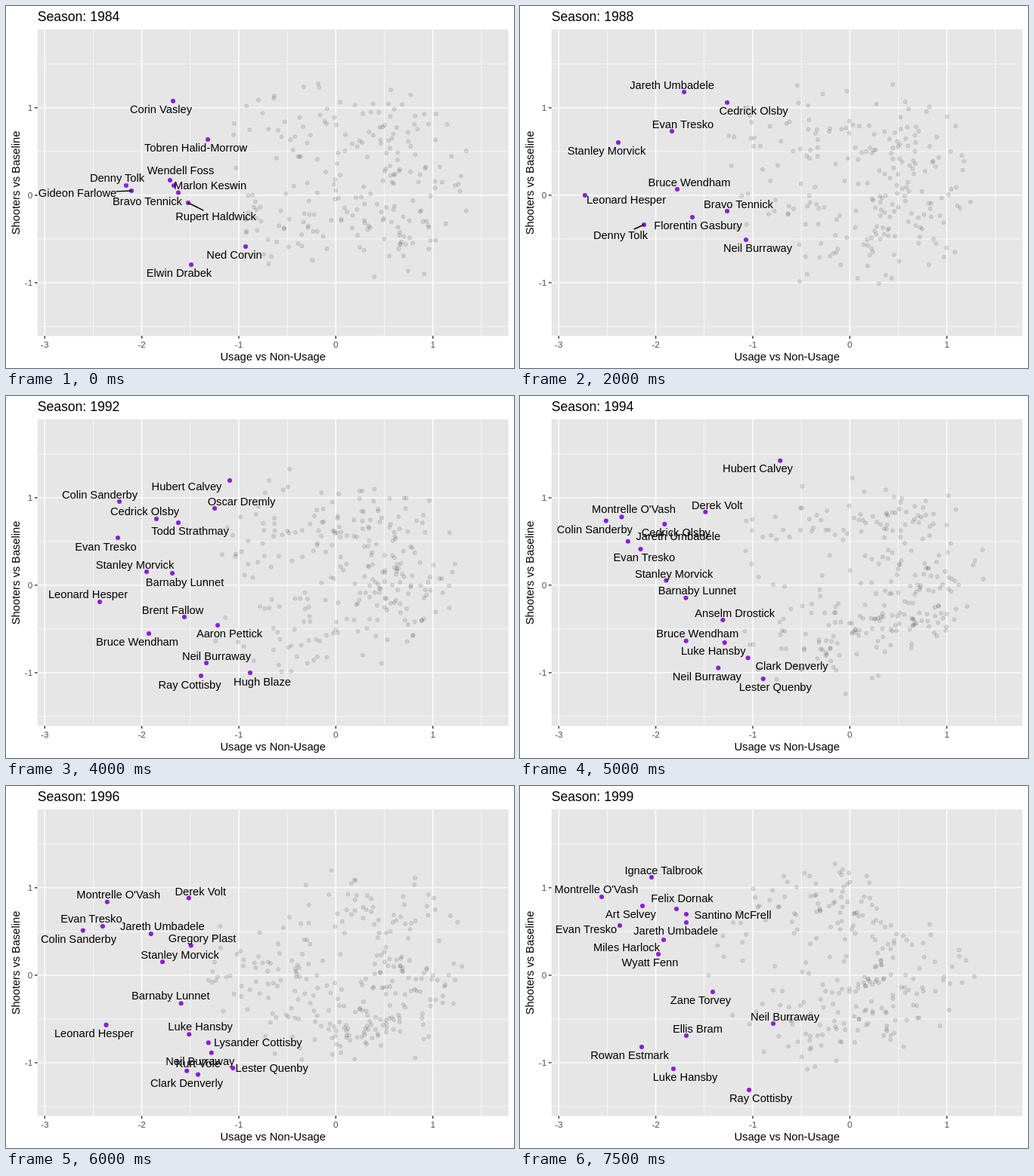
Animation, 672 px wide and 480 px high, one loop 8 s. Source, as an HTML page:

```html
<!DOCTYPE html>
<html lang="en">
<head>
<meta charset="utf-8">
<title>Season scatter</title>
<style>
  html, body { margin: 0; width: 100%; height: 100%; overflow: hidden; background: #fff; }
  svg { display: block; font: 14.67px "Liberation Sans", Arial, sans-serif; }
  .axis { font-size: 11.73px; fill: #4d4d4d; }
  .cloud { fill: #000; fill-opacity: .1; stroke: #000; stroke-opacity: .1; stroke-width: .945; }
  .stars { fill: #8a1fd6; }
  .leaders { stroke: #000; stroke-width: 1.4; }
  .names { text-anchor: middle; }
</style>
</head>
<body>
<svg width="672" height="480">
  <text id="title" x="41.7" y="20" font-size="17.6"></text>
  <g id="grid"></g>
  <g id="plot"></g>
  <text x="353.2" y="470" text-anchor="middle">Usage vs Non-Usage</text>
  <text transform="translate(18 234.5) rotate(-90)" text-anchor="middle">Shooters vs Baseline</text>
</svg>
<script>
const FIRST = 1984, COUNT = 16, STEP = 500;
const $ = id => document.getElementById(id);
const lerp = (a, b, f) => a + (b - a) * f;
const seasons = {};

// blobs: centre x, y, spread x, y, points. stars: name, point x, y, label x, y, leader line
const season = (year, blobs, stars) => { seasons[year] = { blobs, stars }; };

season(1984, [[500, 165, 65, 38, 60], [545, 235, 32, 40, 30], [485, 290, 65, 35, 75], [345, 165, 45, 38, 27], [360, 290, 35, 30, 30]], [
  ['Corin Vasley', 221, 126, 205, 137],
  ['Tobren Halid-Morrow', 267, 177, 251, 188],
  ['Wendell Foss', 217, 231, 231, 218],
  ['Denny Tolk', 159, 238, 147, 228],
  ['Gideon Farlowe', 166, 245, 94.5, 248, 1],
  ['Marlon Keswin', 222, 238, 270, 238],
  ['Bravo Tennick', 228, 247.5, 187, 259],
  ['Rupert Haldwick', 241, 261, 277.5, 279, 1],
  ['Ned Corvin', 317, 319, 302, 330],
  ['Elwin Drabek', 245, 343, 229, 354]]);

season(1988, [[470, 165, 60, 34, 55], [525, 215, 38, 38, 40], [510, 295, 50, 35, 65], [385, 280, 48, 40, 38], [330, 160, 42, 35, 22]], [
  ['Jareth Umbadele', 217, 114, 201, 105],
  ['Cedrick Olsby', 274, 128, 309, 139],
  ['Evan Tresko', 201, 166, 215.5, 157],
  ['Stanley Morvick', 130, 181, 114.5, 192],
  ['Bruce Wendham', 208, 243, 224, 234],
  ['Leonard Hesper', 86, 251, 140.5, 257],
  ['Bravo Tennick', 274, 272, 289, 263],
  ['Florentin Gasbury', 228, 280, 235.5, 291],
  ['Denny Tolk', 164, 290, 133, 304, 1],
  ['Neil Burraway', 299, 310, 314.5, 321]]);

season(1990, [[490, 160, 58, 32, 65], [540, 225, 36, 34, 42], [510, 290, 52, 32, 52], [400, 275, 45, 38, 38], [340, 165, 38, 32, 32]], [
  ['Colin Sanderby', 169, 110, 143, 100],
  ['Jareth Umbadele', 170, 111, 254, 120, 1],
  ['Cedrick Olsby', 161, 150, 204.5, 141],
  ['Stanley Morvick', 142, 166, 98.5, 156],
  ['Evan Tresko', 122, 178, 106.5, 189],
  ['Bruce Wendham', 230, 245, 212.5, 233],
  ['Simon Pelgar', 289, 234, 314, 225],
  ['Denny Tolk', 227, 259, 180, 253, 1],
  ['Rex Holbeick', 238, 262, 258.5, 273],
  ['Leonard Hesper', 95, 295, 111, 285],
  ['Gus Lavorn', 359, 289, 374.5, 279],
  ['Brent Fallow', 252, 319, 215, 309],
  ['Aaron Pettick', 263, 295, 311, 306],
  ['Bravo Tennick', 201, 331, 185, 342],
  ['Neil Burraway', 275, 337, 291, 348]]);

season(1992, [[465, 165, 55, 28, 65], [515, 220, 38, 30, 35], [500, 270, 45, 24, 72], [380, 315, 45, 30, 45], [345, 185, 42, 36, 35]], [
  ['Hubert Calvey', 296, 112, 239, 120],
  ['Colin Sanderby', 150, 140, 124, 131],
  ['Oscar Dremly', 276, 149, 311.5, 140],
  ['Cedrick Olsby', 199, 163, 183.5, 153],
  ['Todd Strathmay', 228, 168, 243.5, 179],
  ['Evan Tresko', 148, 188, 132, 200],
  ['Stanley Morvick', 186, 233, 170.5, 224],
  ['Barnaby Lunnet', 220, 235, 236.5, 247],
  ['Leonard Hesper', 124, 273, 108.5, 263],
  ['Brent Fallow', 236, 293, 220.5, 284],
  ['Aaron Pettick', 280, 304, 295.5, 315],
  ['Bruce Wendham', 189, 315, 173.5, 326],
  ['Neil Burraway', 265, 354, 278.5, 345],
  ['Ray Cottisby', 258, 371, 243, 383],
  ['Hugh Blaze', 323, 367, 339, 379]]);

season(1995, [[495, 168, 55, 28, 60], [535, 245, 32, 24, 50], [500, 315, 50, 17, 70], [375, 325, 50, 30, 65], [335, 180, 45, 36, 22]], [
  ['Hubert Calvey', 359, 70, 343, 81],
  ["Montrelle O'Vash", 130, 155, 146, 145],
  ['Derek Volt', 245, 155, 260.5, 146],
  ['Colin Sanderby', 110, 185, 98.5, 176],
  ['Jareth Umbadele', 153.5, 187, 220, 180],
  ['Evan Tresko', 155, 196, 170, 207],
  ['Stanley Morvick', 209, 237, 232, 228],
  ['Barnaby Lunnet', 207, 274, 191.5, 265],
  ['Anselm Drostick', 271, 301, 287, 292],
  ['Bruce Wendham', 244, 318, 194.5, 312],
  ['Luke Hansby', 265, 325, 290, 316],
  ['Lysander Cottisby', 263, 333, 160, 332, 1],
  ['Neil Burraway', 274, 354, 282, 345],
  ['Clark Denverly', 294, 359, 352, 370],
  ['Lester Quenby', 312, 379, 328, 390]]);

season(1997, [[500, 170, 48, 26, 55], [530, 285, 33, 27, 82], [425, 335, 42, 20, 70], [355, 185, 42, 34, 42], [310, 320, 36, 34, 20]], [
  ["Montrelle O'Vash", 152, 130, 127.5, 141],
  ['Evan Tresko', 115, 185, 99, 176],
  ['Cedrick Olsby', 212, 161, 236, 152],
  ['Abe Tarno', 235, 190, 250.5, 180],
  ['Jareth Umbadele', 207, 197, 165, 208],
  ['Gregory Plast', 253.5, 210, 285.5, 220],
  ['Wyatt Fenn', 169, 223, 153.5, 234],
  ['Barnaby Lunnet', 240, 310, 228, 298],
  ['Lysander Cottisby', 274, 327, 259, 318],
  ['Leonard Hesper', 139, 313, 123, 324],
  ['Neil Burraway', 289, 335, 304.5, 346],
  ['Luke Hansby', 229, 339, 199, 350],
  ['Kurt Vole', 251, 377, 281.5, 367],
  ['Clark Denverly', 235, 385, 177, 389],
  ['Ray Cottisby', 259, 397, 287, 408]]);

season(1999, [[425, 150, 30, 28, 45], [500, 270, 42, 28, 75], [390, 305, 45, 34, 65], [340, 180, 48, 42, 35], [470, 200, 45, 20, 20]], [
  ['Ignace Talbrook', 174, 121, 190, 112],
  ["Montrelle O'Vash", 108, 147, 101, 137],
  ['Felix Dornak', 207, 163, 214.5, 149],
  ['Art Selvey', 162, 159, 146.5, 170],
  ['Santino McFrell', 220, 170, 281.5, 171],
  ['Jareth Umbadele', 220, 181, 206, 192],
  ['Evan Tresko', 132, 185, 87.5, 190],
  ['Miles Harlock', 190, 204, 141, 214],
  ['Wyatt Fenn', 183, 223, 172, 234],
  ['Zane Torvey', 255, 273, 239, 284],
  ['Neil Burraway', 335, 315, 350.5, 306],
  ['Ellis Bram', 220, 331, 235, 322],
  ['Rowan Estmark', 161, 346, 145, 357],
  ['Luke Hansby', 203, 375, 218.5, 386],
  ['Ray Cottisby', 303, 403, 318.5, 414]]);

function random(seed) {
  return () => {
    seed = seed + 0x6D2B79F5 | 0;
    let t = Math.imul(seed ^ seed >>> 15, 1 | seed);
    t = t + Math.imul(t ^ t >>> 7, 61 | t) ^ t;
    return ((t ^ t >>> 14) >>> 0) / 4294967296;
  };
}

const halfWidth = name => name.length * 3.5;

// Moves each label to the least crowded spot around its point
function arrange(stars) {
  const placed = [];
  for (const s of stars) {
    const [name, x, y, lx, ly] = s, w = halfWidth(name);
    const spots = [[lx - x, ly - y], [15, -10], [-15, 11], [15, 11], [-15, -10],
      [w + 6, 0], [-w - 6, 0], [w + 25, 9, 1], [-w - 25, 9, 1]];
    let best, least = Infinity;
    for (const [dx, dy, leader] of spots) {
      const cx = Math.max(x + dx, 47 + w), cy = y + dy;
      const hits = placed.filter(p => Math.abs(p.x - cx) < p.w + w + 2 && Math.abs(p.y - cy) < 13).length
        + stars.filter(p => Math.abs(p[1] - cx) < w + 3 && Math.abs(p[2] - cy) < 8).length;
      if (hits < least) { least = hits; best = [cx, cy, leader]; }
    }
    s.splice(3, 3, ...best);
    placed.push({ x: best[0], y: best[1], w });
  }
  return stars;
}

// Blends the neighbouring seasons for a year that has no rows of its own
function between(year) {
  let a = year, b = year;
  while (!seasons[a]) a--;
  while (!seasons[b]) b++;
  const f = (year - a) / (b - a), from = seasons[a], to = seasons[b], rnd = random(year * 7);
  const mix = (p, q) => p.map((v, i) => lerp(v, q[i], f));
  const blobs = from.blobs.map((p, i) => mix(p, to.blobs[i]));
  const rank = i => (i % 4 + .5) / 4;
  const stars = [];
  const add = (name, spot) => {
    const dx = rnd() * 24 - 12, dy = rnd() * 24 - 12;
    stars.push([name, spot[0] + dx, spot[1] + dy, spot[2] + dx, spot[3] + dy]);
  };
  from.stars.forEach(([name, ...p], i) => {
    const next = to.stars.find(s => s[0] === name);
    if (next) add(name, mix(p.slice(0, 4), next.slice(1)));
    else if (rank(i) > f) add(name, p);
  });
  to.stars.forEach(([name, ...p], i) => {
    if (!from.stars.some(s => s[0] === name) && rank(i) < f) add(name, p);
  });
  return { blobs, stars: arrange(stars) };
}

const circle = (x, y, r) => `<circle cx="${x.toFixed(1)}" cy="${y.toFixed(1)}" r="${r}"/>`;

function cloud(year, blobs) {
  const rnd = random(year), bell = () => (rnd() + rnd() + rnd() - 1.5) * 2;
  let out = '';
  for (const [cx, cy, sx, sy, n] of blobs) {
    for (let i = 0; i < n;) {
      const x = cx + bell() * sx, y = cy + bell() * sy;
      if (Math.hypot((x - 435) / 186, (y - 245) / 160) > 1) continue;
      out += circle(x, y, 2.6);
      i++;
    }
  }
  return out;
}

function leaderLine([name, x, y, lx, ly]) {
  const dx = x - lx, dy = y - ly;
  const k = Math.min((halfWidth(name) + 2) / Math.abs(dx), 8 / Math.abs(dy));
  return `<path d="M${x} ${y}L${lx + dx * k} ${ly + dy * k}"/>`;
}

function draw(year) {
  const { blobs, stars } = seasons[year] || between(year);
  const each = f => stars.map(f).join('');
  return `<g class="cloud">${cloud(year, blobs)}</g>
    <g class="stars">${each(s => circle(s[1], s[2], 3.05))}</g>
    <g class="leaders">${each(s => s[5] ? leaderLine(s) : '')}</g>
    <g class="names">${each(s => `<text x="${s[3]}" y="${s[4] + 5}">${s[0]}</text>`)}</g>`;
}

function drawGrid() {
  const line = (d, w, c = '#fff') => `<path d="${d}" stroke="${c}" stroke-width="${w}"/>`;
  let out = '<path d="M41.7 31H664.7V437.4H41.7Z" fill="#e6e6e6"/>';
  for (let v = -3; v <= 1.5; v += .5) {
    const x = 436.3 + v * 128.35, major = v % 1 === 0;
    out += line(`M${x} 31V437.4`, major ? 1.42 : .71);
    if (major) out += line(`M${x} 437.4v3.7`, 1.42, '#333')
      + `<text class="axis" x="${x}" y="453" text-anchor="middle">${v}</text>`;
  }
  for (let v = -1.5; v <= 1.5; v += .5) {
    const y = 250.9 - v * 116, major = v % 1 === 0;
    out += line(`M41.7 ${y}H664.7`, major ? 1.42 : .71);
    if (major) out += line(`M41.7 ${y}h-3.7`, 1.42, '#333')
      + `<text class="axis" x="35.2" y="${y + 4.2}" text-anchor="end">${v}</text>`;
  }
  $('grid').innerHTML = out;
}

drawGrid();
const pages = Array.from({ length: COUNT }, (_, i) => draw(FIRST + i));
const start = performance.now();
let shown = -1;

function tick() {
  const i = Math.floor((performance.now() - start) / STEP) % COUNT;
  if (i !== shown) {
    shown = i;
    $('title').textContent = 'Season: ' + (FIRST + i);
    $('plot').innerHTML = pages[i];
  }
  requestAnimationFrame(tick);
}
tick();
</script>
</body>
</html>
```
